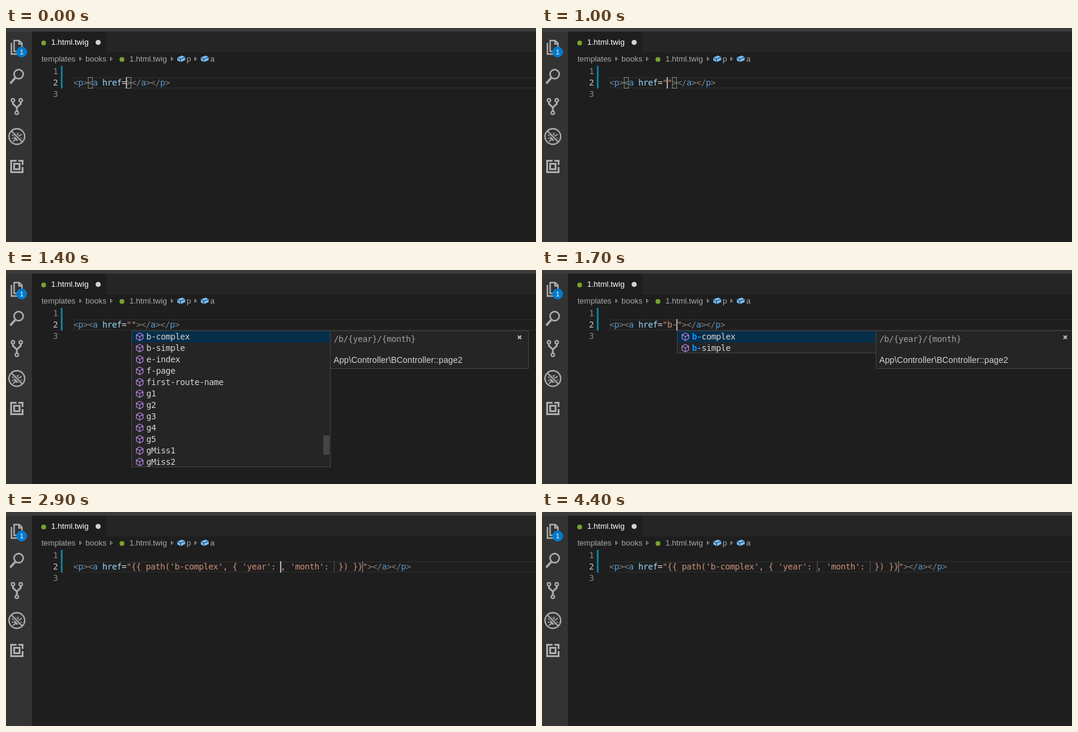
Write an HTML page that moves like this. It is 880 by 357 pixels and loops after 4800 ms.

```html
<!DOCTYPE html>
<html lang="en">
<head>
<meta charset="utf-8">
<title>Route completion in a template editor</title>
<style>
html, body { margin: 0; width: 100%; height: 100%; overflow: hidden; background: #1e1e1e; }
#stage { position: relative; width: 880px; height: 357px; overflow: hidden; background: #1e1e1e;
  font: 13px "Liberation Sans", Arial, sans-serif; color: #a9a9a9; }
#stage div, #stage svg, #stage b { position: absolute; }
#stage div { white-space: pre; }
.top { left: 0; top: 0; width: 880px; height: 6px; background: #3c3c3c; }
.side { left: 0; top: 6px; width: 43px; height: 351px; background: #333; }
.tabs { left: 43px; top: 6px; width: 837px; height: 35px; background: #252526; }
.tab { left: 43px; top: 6px; width: 124px; height: 35px; background: #1e1e1e; }
.name { left: 75px; top: 6px; line-height: 35px; color: #fff; }
.crumb { top: 41px; line-height: 22px; }
.chrome { left: 0; top: 0; }

/* fixed 8px character grid */
.mono { font: 14px/19px "DejaVu Sans Mono", monospace; letter-spacing: calc(8px - 1ch); }
.num { left: 78px; color: #858585; }
.num.on { color: #c6c6c6; }
.gutter { left: 91px; top: 63px; width: 3px; height: 38px; background: #0c7d9d; }
.line { left: 112px; top: 82px; width: 780px; height: 15px; border: 2px solid #282828; }
.code { left: 112px; top: 82px; color: #ce9178; }
.code i { font-style: normal; color: #808080; }
.code u { text-decoration: none; color: #569cd6; }
.code s { text-decoration: none; color: #9cdcfe; }
.code em { font-style: normal; color: #d4d4d4; }
.match { top: 82px; width: 6px; height: 17px; border: 1px solid #888; background: rgba(0,100,0,.1); }
.stop { top: 82px; width: 2px; height: 19px; background: rgba(124,124,124,.3); }
.stop.end { background: #606060; }
.caret { left: 0; top: 82px; width: 2px; height: 19px; background: #aeafad; }
.warn { left: 208px; top: 100px; width: 15px; height: 1px; background: #ce9178; }

.box { top: 101px; box-sizing: border-box; border: 1px solid #454545; background: #252526; }
.list { left: 208px; width: 331px; }
.row { left: 0; width: 329px; height: 19px; color: #d4d4d4; }
.row.on { background: #062f4a; }
.row svg { left: 6px; top: 2px; }
.row span { position: absolute; left: 24px; }
#stage .row b { position: static; color: #0097fb; }
.thumb { left: 318px; top: 174px; width: 10px; height: 32px; background: #464647; }
.docs { left: 538px; width: 330px; height: 64px; }
.docs .mono { left: 5px; top: 4px; color: #a0a0a0; }
.owner { left: 5px; top: 39px; font-size: 14px; line-height: 19px; color: #d4d4d4;
  letter-spacing: calc((8px - 1ch) * .55); }
.docs svg { left: 310px; top: 6px; }

/* 4.8s timeline */
.scene, .caret, .warn { animation: 4.8s step-end infinite; }
.scene { left: 0; top: 0; }
.bare { animation-name: bare; }
.quoted { animation-name: quoted; }
.paired { animation-name: paired; }
.all { animation-name: all; }
.typed { animation-name: typed; }
.done { animation-name: done; }
.warn { animation-name: warn; }
.caret { animation-name: caret; }
@keyframes bare { 0% { opacity: 1 } 20.8333%, 100% { opacity: 0 } }
@keyframes quoted { 0%, 35.4167%, 100% { opacity: 0 } 20.8333% { opacity: 1 } }
@keyframes paired { 0%, 22.9167%, 100% { opacity: 0 } 20.8333% { opacity: 1 } }
@keyframes all { 0%, 35.4167%, 100% { opacity: 0 } 22.9167% { opacity: 1 } }
@keyframes typed { 0%, 60.4167%, 100% { opacity: 0 } 35.4167% { opacity: 1 } }
@keyframes done { 0% { opacity: 0 } 60.4167%, 100% { opacity: 1 } }
@keyframes warn { 0%, 60.4167%, 100% { opacity: 0 } 39.5833% { opacity: 1 } }
@keyframes caret {
  0% { left: 199px; opacity: 1 }
  6.25% { left: 199px; opacity: 0 }
  16.6667% { left: 199px; opacity: 1 }
  20.8333% { left: 207px; opacity: 1 }
  29.1667% { left: 207px; opacity: 0 }
  35.4167% { left: 223px; opacity: 1 }
  45.8333% { left: 223px; opacity: 0 }
  56.25% { left: 223px; opacity: 1 }
  60.4167% { left: 455px; opacity: 1 }
  70.8333% { left: 455px; opacity: 0 }
  83.3333% { left: 455px; opacity: 1 }
  91.6667%, 100% { left: 455px; opacity: 0 }
}
</style>
</head>
<body>
<div id="stage">
  <div class="top"></div>
  <div class="side"></div>
  <div class="tabs"></div>
  <div class="tab"></div>
  <div class="name">1.html.twig</div>
  <div class="crumb" style="left:59px">templates</div>
  <div class="crumb" style="left:132px">books</div>
  <div class="crumb" style="left:205px">1.html.twig</div>
  <div class="crumb" style="left:300px">p</div>
  <div class="crumb" style="left:339px">a</div>

  <svg class="chrome" width="880" height="357" fill="none" stroke="#adadad">
    <defs>
      <path id="arrow" d="M0 -2.7L3.2 0L0 2.7Z" stroke="#b5b5b5"/>
      <g id="brick" stroke="none">
        <path d="M-6.5 -2.5L1.5 -5.5L6.5 -3V2L-1.5 5.5L-6.5 2.5Z" fill="#75beff"/>
        <path d="M-6.5 -2.2L-1.5 .4L6.5 -2.8M-1.5 .4V5.5" stroke="#1e1e1e"/>
      </g>
      <path id="cube" d="M7 1L12.5 4V10.5L7 13.8L1.5 10.5V4ZM1.5 4L7 7.2L12.5 4M7 7.2V13.8"
        fill="none" stroke="#b180d7" stroke-width="1.3" stroke-linejoin="round"/>
    </defs>
    <g stroke="none">
      <circle cx="62.5" cy="25" r="4" fill="#78a22f"/>
      <circle cx="192.5" cy="52.5" r="4" fill="#78a22f"/>
      <circle cx="153" cy="24" r="4.3" fill="#d0d0d0"/>
    </g>
    <use href="#arrow" x="122.5" y="51.5"/>
    <use href="#arrow" x="173.5" y="51.5"/>
    <use href="#arrow" x="274.5" y="51.5"/>
    <use href="#arrow" x="313.5" y="51.5"/>
    <use href="#brick" x="291" y="51.5"/>
    <use href="#brick" x="330" y="51.5"/>

    <!-- files -->
    <path d="M13.5 39V21H22L26.5 25.5V39ZM21.5 21V26.5H27M9 25V43.5H21" stroke-width="2.4"/>
    <circle cx="26" cy="40" r="9" fill="#007acc" stroke="none"/>
    <text x="26" y="44" text-anchor="middle" font-size="11" fill="#fff" stroke="none">1</text>
    <!-- search -->
    <circle cx="21" cy="77" r="7.6" stroke-width="2.6"/>
    <path d="M15.5 83L7 92.5" stroke-width="3.6"/>
    <!-- branches -->
    <g stroke-width="2.2">
      <circle cx="11.5" cy="120.5" r="2.7"/>
      <circle cx="24.5" cy="120.5" r="2.7"/>
      <circle cx="18" cy="141.5" r="2.7"/>
      <path d="M11.5 123.5V126.5L18 132.5L24.5 126.5V123.5M18 131.5V138.5" stroke-width="3"/>
    </g>
    <!-- debug -->
    <ellipse cx="18" cy="182.5" rx="4" ry="5.5" fill="#adadad" stroke="none"/>
    <path d="M15 175L18 178L21 175M10 178L14 180.5M9.5 184H14M11.5 189.5L15 186.5M26 177L22 180.5M26.5 184H22M24.5 189.5L21 186.5" stroke-width="1.7"/>
    <path d="M9 172L27.5 190.5" stroke="#333" stroke-width="5"/>
    <circle cx="18" cy="181" r="13" stroke-width="2.3"/>
    <path d="M9 172L27.5 190.5" stroke-width="2.3"/>
    <!-- extensions -->
    <path d="M17.5 221.5H8.5V240.5H27.5V232M20.5 221.5H27.5V228.5" stroke-width="3"/>
    <rect x="13.5" y="226.5" width="9" height="9" stroke-width="3"/>
  </svg>

  <div class="mono num" style="top:63px">1</div>
  <div class="mono num on" style="top:82px">2</div>
  <div class="mono num" style="top:101px">3</div>
  <div class="gutter"></div>
  <div class="line"></div>

  <div class="scene bare">
    <div class="match" style="left:136px"></div>
    <div class="match" style="left:200px"></div>
    <div class="mono code" data-value=""></div>
  </div>
  <div class="scene paired">
    <div class="match" style="left:136px"></div>
    <div class="match" style="left:216px"></div>
  </div>
  <div class="scene quoted"><div class="mono code" data-value='""'></div></div>
  <div class="scene typed"><div class="mono code" data-value='"b-"'></div></div>
  <div class="scene done">
    <div class="stop" style="left:456px"></div>
    <div class="stop" style="left:544px"></div>
    <div class="stop end" style="left:591px"></div>
    <div class="mono code" data-value="&quot;{{ path('b-complex', { 'year': , 'month':  }) }}&quot;"></div>
  </div>
  <div class="warn"></div>
  <div class="caret"></div>
  <div class="scene all" id="all"></div>
  <div class="scene typed" id="filtered" style="left:16px"></div>
</div>
<script>
const routes = ["b-complex", "b-simple", "e-index", "f-page", "first-route-name",
  "g1", "g2", "g3", "g4", "g5", "gMiss1", "gMiss2"];

const tag = (open, name) => `<i>${open}</i><u>${name}</u>`;
for (const el of document.querySelectorAll(".code")) {
  el.innerHTML = tag("&lt;", "p") + "<i>&gt;</i>" + tag("&lt;", "a") +
    ` <s>href</s><em>=</em>${el.dataset.value}<i>&gt;</i>` +
    tag("&lt;/", "a") + "<i>&gt;</i>" + tag("&lt;/", "p") + "<i>&gt;</i>";
}

function popup(id, prefix, extra = "") {
  const found = routes.filter(name => name.startsWith(prefix));
  const rows = found.map((name, i) =>
    `<div class="row mono${i ? "" : " on"}" style="top:${i * 19}px">` +
    `<svg width="14" height="15"><use href="#cube"/></svg>` +
    `<span><b>${prefix}</b>${name.slice(prefix.length)}</span></div>`).join("");
  const height = found.length * 19 + (extra ? 0 : 0);
  document.getElementById(id).innerHTML =
    `<div class="box list" style="height:${height}px">${rows}${extra}</div>` +
    `<div class="box docs"><div class="mono">/b/{year}/{month}</div>` +
    `<svg width="8" height="9"><path d="M1 1.5L6.5 7M6.5 1.5L1 7" stroke="#c5c5c5" stroke-width="1.8"/></svg>` +
    `<div class="owner">App\\Controller\\BController::page2</div></div>`;
}
popup("all", "", '<div class="thumb"></div>');
popup("filtered", "b-");
</script>
</body>
</html>
```
